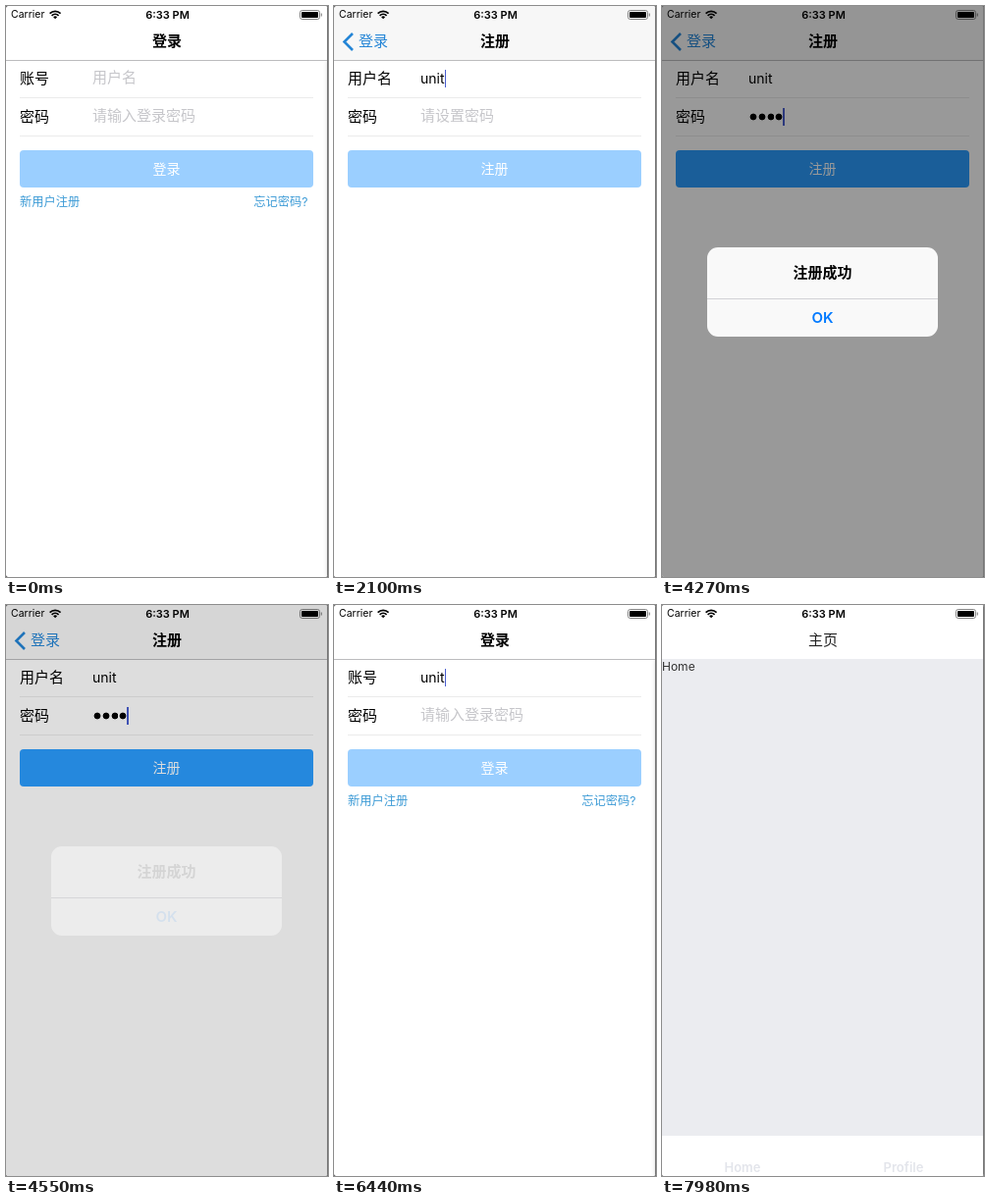
Recreate the animation shown at these times as an HTML page. Size 328 px wide and 582 px high, loop 8000 ms.

```html
<!DOCTYPE html>
<html lang="zh-CN">
<head>
<meta charset="utf-8">
<title>登录</title>
<style>
/* --p: page progress, 0 login, 1 register. --u/--w: typed characters, --cu/--cw: carets */
@property --p { syntax: "<number>"; inherits: true; initial-value: 0; }
@property --u { syntax: "<number>"; inherits: true; initial-value: 0; }
@property --w { syntax: "<number>"; inherits: true; initial-value: 0; }
@property --cu { syntax: "<number>"; inherits: true; initial-value: 0; }
@property --cw { syntax: "<number>"; inherits: true; initial-value: 0; }
@property --n { syntax: "<number>"; inherits: true; initial-value: 0; }
@property --c { syntax: "<number>"; inherits: true; initial-value: 0; }

* { box-sizing: border-box; }
html, body { margin: 0; width: 100%; height: 100%; overflow: hidden; background: #444; }
#stage {
  position: relative; width: 328px; height: 582px; overflow: hidden;
  background: #000; border-radius: 2px; color: #000;
  font: 15px/20px Inter, "Noto Sans CJK SC", "Noto Sans CJK", sans-serif;
  animation: pages 8s linear infinite;
}
#stage div, #stage svg, #stage span.abs { position: absolute; }
#stage .fill { inset: 0; }
#edge { right: 0; top: 0; width: 1px; height: 582px; background: #777; }

/* navigation bar */
#nav { left: 0; top: 0; width: 328px; height: 56px; background: #fff; border-bottom: 1px solid #bcbcbe; overflow: hidden; }
.tint { background: #f7f7f7; opacity: calc(var(--p) * 4 - 3); }
.title { left: 0; top: 26px; width: 328px; text-align: center; font-weight: 600; }
#nav .t1 { opacity: calc(1 - var(--p)); transform: translateX(calc(var(--p) * -175px)); }
#nav .t2 { opacity: var(--p); transform: translateX(calc((1 - var(--p)) * 175px)); }
#back { left: 0; top: 0; width: 70px; height: 55px; color: #2485d6; opacity: calc(var(--p) * 2 - 1); }
#back div { left: 0; top: 0; width: 70px; height: 55px; animation: backTap 8s linear infinite; }
#back span { left: 25px; top: 26px; }

/* pages */
.card { left: 0; top: 56px; width: 328px; height: 526px; background: #fff; }
#login { transform: translateX(calc(var(--p) * -98.4px)); animation: loginType 8s step-end infinite; }
#reg {
  transform: translateX(calc((1 - var(--p)) * 328px));
  box-shadow: 0 0 5px rgba(0, 0, 0, .2);
  animation: regType 8s step-end infinite;
}
.shade { background: #000; opacity: calc(var(--p) * .15); }
.row { left: 14px; width: 299px; height: 39px; border-bottom: 1px solid #ebebeb; }
.row.user { top: -1px; --n: var(--u); --c: var(--cu); }
.row.pass { top: 38px; --n: var(--w); --c: var(--cw); }
.row .label { left: 0; top: 9px; }
.hint { left: 74px; top: 8px; color: #c6c6ca; opacity: calc(1 - var(--n)); }
#stage .val { left: 74px; top: 9px; height: 20px; display: flex; align-items: center; font-size: 14px; }
.val i { font-style: normal; overflow: hidden; max-width: calc((var(--n) - var(--i)) * 20px); }
.val i:nth-child(1) { --i: 0; }
.val i:nth-child(2) { --i: 1; }
.val i:nth-child(3) { --i: 2; }
.val i:nth-child(4) { --i: 3; }
.val .dot { flex: none; width: 8.8px; height: 8px; background: radial-gradient(circle at 5px 4px, #000 3.1px, transparent 3.7px); }
.val b { flex: none; width: 1.5px; height: 18px; background: #4a5fd0; opacity: var(--c); }
.btn {
  left: 14px; top: 91px; width: 299px; height: 38px; border-radius: 4px; overflow: hidden;
  background: linear-gradient(rgb(43 157 255 / var(--w)) 0 0) #9bcfff;
  color: #fff; font-size: 14px; line-height: 38px; text-align: center;
}
#login .btn { animation: loginTap 8s linear infinite; }
#reg .btn { animation: regTap 8s linear infinite; }
.link { top: 134px; color: #3d9bd6; font-size: 12.25px; }
#join { left: 14px; animation: linkTap 8s linear infinite; }
#lost { right: 20.5px; }

/* home page */
#home { background: #ebecf0; animation: home 8s linear infinite; }
#home .head { left: 0; top: 0; width: 328px; height: 55px; background: #fff; }
#home .head .title { font-weight: 500; color: #222; }
#home .text { left: 0; top: 53px; font-size: 12px; color: #333; }
#home .tabs { left: 0; top: 541px; width: 328px; height: 41px; background: #fff; }
.tabs div { top: 22px; width: 164px; text-align: center; font-size: 13px; font-weight: 600; color: #e3e5eb; }

/* status bar */
#status { left: 0; top: 0; width: 328px; height: 18px; font-size: 10.5px; line-height: 18px; }
#time { width: 329px; text-align: center; font-weight: 600; font-size: 11px; }

/* alert */
#dim { background: #000; opacity: 0; animation: dim 8s linear infinite; }
#alert {
  left: 46px; top: 246px; width: 235px; height: 91px; border-radius: 11px;
  background: #f9f9f9; opacity: 0; text-align: center; font-weight: 600;
  animation: alert 8s linear infinite;
}
#alert .line { left: 0; top: 52px; width: 235px; height: 1px; background: #d2d2d6; }
#alert .msg { left: 0; width: 235px; animation: msg 8s linear infinite; }

@keyframes pages {
  0%, 5.75% { --p: 0; animation-timing-function: cubic-bezier(.2833, .99, .31833, .99); }
  12% { --p: 1; }
  65.225% { --p: 1; animation-timing-function: cubic-bezier(.2833, .99, .31833, .99); }
  71.475%, 100% { --p: 0; }
}
@keyframes regType {
  0% { --u: 0; --w: 0; --cu: 0; --cw: 0; }
  16.625% { --cu: 1; }
  19.25% { --u: 1; }
  21% { --u: 2; }
  22.75% { --u: 3; }
  25.375% { --u: 4; }
  27.125% { --cu: 0; }
  28% { --cw: 1; }
  31.5% { --w: 1; }
  33.25% { --w: 2; }
  34.125% { --w: 3; }
  35.875% { --w: 4; }
  42.875% { --cw: 0; }
  49.875% { --cw: 1; }
  65.2% { --cw: 0; }
}
@keyframes loginType {
  0% { --u: 0; --w: 0; --cu: 0; --cw: 0; }
  73.5% { --cu: 1; }
  76.125% { --u: 1; }
  77% { --u: 2; }
  78.75% { --u: 3; }
  80.5% { --u: 4; }
  85.75% { --cu: 0; }
  86.625% { --cw: 1; }
  88.375% { --w: 1; }
  89.25% { --w: 2; }
  91% { --w: 3; }
  92.75% { --w: 4; }
}
@keyframes linkTap {
  0%, .6% { opacity: 1; }
  1.75%, 4.3% { opacity: .25; }
  6.125%, 100% { opacity: 1; }
}
@keyframes backTap {
  0%, 62.5% { opacity: 1; }
  63.8%, 66% { opacity: .3; }
  72%, 100% { opacity: 1; }
}
@keyframes regTap {
  0%, 42.125% { opacity: 1; }
  43.75%, 45.5% { opacity: .42; }
  48.75%, 100% { opacity: 1; }
}
@keyframes loginTap {
  0%, 95.5% { opacity: 1; }
  96.25%, 100% { opacity: .42; }
}
@keyframes dim {
  0%, 46.5% { opacity: 0; }
  50%, 53.875% { opacity: .4; }
  58.375%, 100% { opacity: 0; }
}
@keyframes alert {
  0%, 46.5% { opacity: 0; transform: scale(1.2); animation-timing-function: ease-out; }
  50%, 53.875% { opacity: 1; transform: none; }
  56.875% { opacity: .58; transform: none; }
  58.375%, 100% { opacity: 0; transform: none; }
}
@keyframes msg {
  0%, 53.875% { opacity: 1; }
  56.875% { opacity: .17; }
  58.375%, 100% { opacity: 0; }
}
@keyframes home {
  0%, 97.2% { opacity: 0; }
  99.6%, 100% { opacity: 1; }
}
</style>
</head>
<body>
<div id="stage">
  <div class="card" id="login">
    <div class="row user">
      <div class="label">账号</div><div class="hint">用户名</div>
      <div class="val"><i>u</i><i>n</i><i>i</i><i>t</i><b></b></div>
    </div>
    <div class="row pass">
      <div class="label">密码</div><div class="hint">请输入登录密码</div>
      <div class="val"><i class="dot"></i><i class="dot"></i><i class="dot"></i><i class="dot"></i><b></b></div>
    </div>
    <div class="btn">登录</div>
    <div class="link" id="join">新用户注册</div>
    <div class="link" id="lost">忘记密码?</div>
    <div class="fill shade"></div>
  </div>

  <div class="card" id="reg">
    <div class="row user">
      <div class="label">用户名</div><div class="hint">请设置用户名</div>
      <div class="val"><i>u</i><i>n</i><i>i</i><i>t</i><b></b></div>
    </div>
    <div class="row pass">
      <div class="label">密码</div><div class="hint">请设置密码</div>
      <div class="val"><i class="dot"></i><i class="dot"></i><i class="dot"></i><i class="dot"></i><b></b></div>
    </div>
    <div class="btn">注册</div>
  </div>

  <div id="nav">
    <div class="fill tint"></div>
    <div class="title t1">登录</div>
    <div class="title t2">注册</div>
    <div id="back"><div>
      <svg width="24" height="55" fill="none" stroke="currentColor" stroke-width="2.6"><path d="M19 28 10.5 36.5 19 45"/></svg>
      <span class="abs">登录</span>
    </div></div>
  </div>

  <div class="fill" id="home">
    <div class="head"><div class="title">主页</div></div>
    <div class="text">Home</div>
    <div class="tabs"><div>Home</div><div style="left:164px">Profile</div></div>
  </div>

  <div id="status">
    <span class="abs" style="left:5px">Carrier</span>
    <div id="time">6:33 PM</div>
    <svg width="328" height="18" fill="none" stroke="#000">
      <path d="M44.6 7.6a7.8 7.8 0 0 1 11 0M46.6 9.8a5 5 0 0 1 7 0" stroke-width="1.7"/>
      <path d="M50.1 13.2 48.1 11.3a2.8 2.8 0 0 1 4 0z" fill="#000" stroke="none"/>
      <rect x="299.5" y="4.5" width="20" height="9" rx="2.2" stroke="#777" stroke-width=".9"/>
      <rect x="301" y="6" width="17" height="6" rx="1" fill="#000" stroke="none"/>
      <path d="M321.3 7.5v3" stroke="#777"/>
    </svg>
  </div>

  <div class="fill" id="dim"></div>
  <div id="alert">
    <div class="msg" style="top:16px">注册成功</div>
    <div class="line"></div>
    <div class="msg" style="top:62px;color:#007aff">OK</div>
  </div>
  <div id="edge"></div>
</div>
</body>
</html>
```
